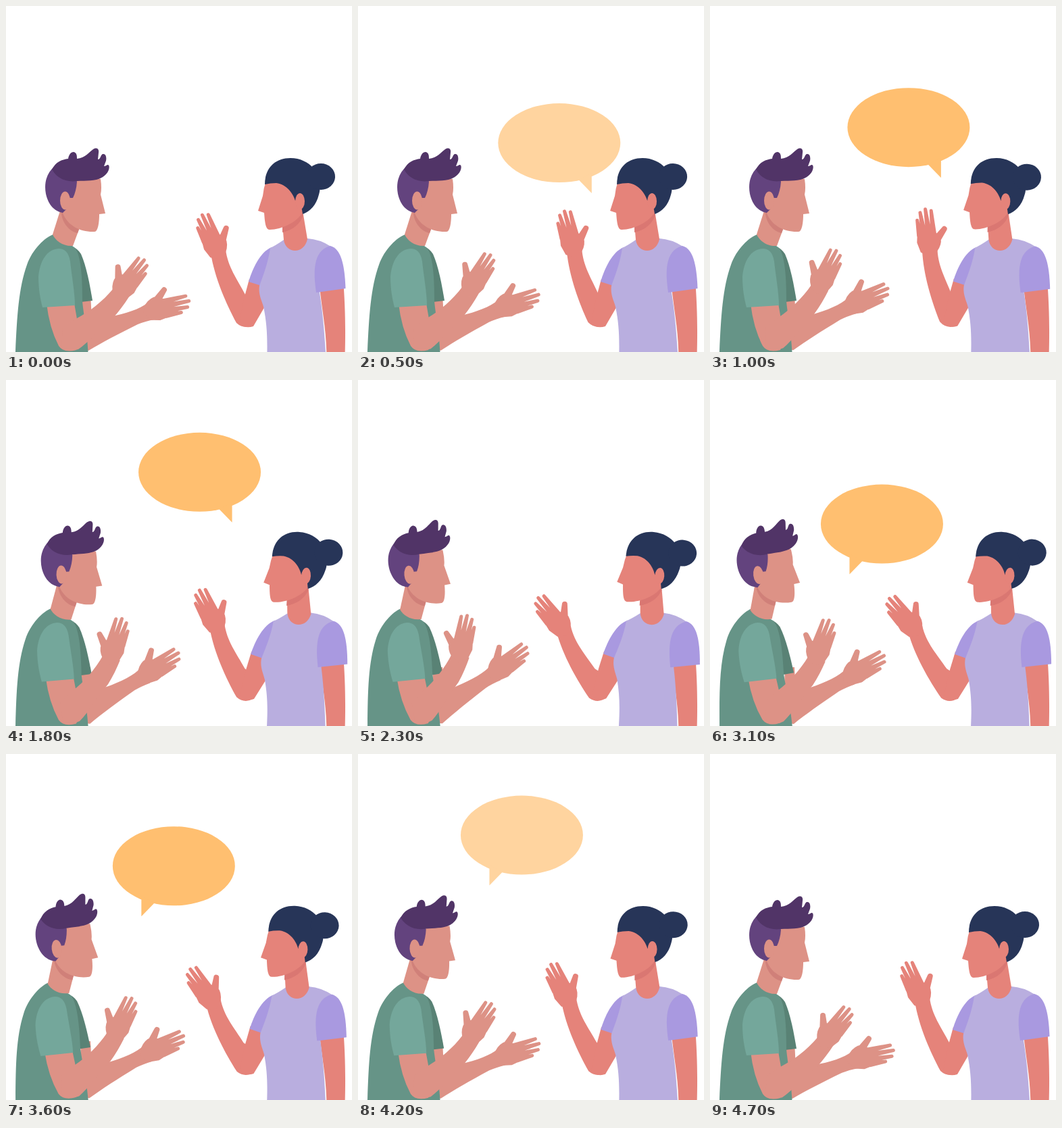
Write an HTML page that moves like this. It is 512 px wide and 512 px high and loops after 4.8 s.

```html
<!DOCTYPE html>
<html lang="en">
<head>
<meta charset="utf-8">
<title>Conversation</title>
<style>
html, body { margin: 0; width: 100%; height: 100%; overflow: hidden; background: #fff; }
svg { display: block; width: 100%; height: 100%; }
.his { fill: #dd9286; }
.her { fill: #e5837a; }
.bubble { fill: #ffbf70; }
</style>
</head>
<body>
<svg viewBox="0 0 512 512">
  <defs>
    <g id="balloon"><ellipse rx="90.5" ry="58.5"/><path d="M29 55L48 74.5V44Z"/></g>
    <path id="hand"/>
  </defs>

  <g class="bubble" id="herBubble"><use href="#balloon"/></g>
  <g class="bubble" id="hisBubble"><use href="#balloon" transform="scale(-1 1)"/></g>

  <!-- man -->
  <g class="his">
    <path d="M111 425H125L127 465L122 500H108Z"/>
    <g id="hisFarArm">
      <path d="M112 470C125 465 138 464 153 460C178 455 197 449 210 439L219 464Q205 467 195 471C165 486 142 498 122 510L108 506Z"/>
      <use id="hisFarHand" href="#hand"/>
    </g>
  </g>
  <g id="hisBody">
    <path fill="#598275" d="M98 356Q106 359 111 367C119 385 124 412 128 436L111 438L98 400Z"/>
    <path fill="#669487" d="M70 338C58 342 39 360 31 383C17 422 16 470 13 532H122C122 490 115 460 113 437C113 410 112 385 107 368Q104 358 98 355Z"/>
    <path class="his" d="M60 440H101L105 463L112 490L104 509Q86 514 78 503Q64 476 60 440Z"/>
    <path fill="#74a79b" d="M78 359C60 360 50 378 48 400C48 420 51 434 54 446L102 443C102 425 97 398 95 378C93 364 86 359 78 359Z"/>
    <g id="hisHead" class="his">
      <path d="M81 300L69 338C73 347 84 356 99 355L109 328L104 280Z"/>
      <path fill="#d08079" d="M82 300C80 318 93 334 106 336L110 325Z"/>
      <path d="M100 250L140 256Q142 270 140 279L147 307L138 308C138 321 136 334 131 334C112 335 88 326 82 300Z"/>
      <path fill="#63437e" d="M72 237C60 247 56 262 59 278C63 296 73 304 84 306L90 300L94 284H99Q104 274 105 260L100 245Z"/>
      <ellipse cx="87.500" cy="288" rx="7.500" ry="13.500"/>
      <path fill="#513467" d="M68 242C73 231 83 227 92 226C93 220 96 216 100 216C105 217 105 222 105 226C117 225 123 216 129 212C134 209 138 211 137 217L136 227C140 227 140 220 143 219C148 218 149 224 148 229L145 237C148 237 149 235 151 235C154 236 153 244 148 249C138 260 122 258 105 259C90 261 76 256 68 242Z"/>
    </g>
  </g>
  <g class="his" id="hisNearArm">
    <path d="M84 475L105 462C124 452 143 437 158 419L182 430C175 441 167 452 158 462C141 476 122 498 107 508Q92 512 82 506Z"/>
    <use id="hisNearHand" href="#hand"/>
  </g>

  <!-- woman -->
  <path class="her" d="M464 405H499C502 445 503 480 501 532H474C476 488 468 455 464 415Z"/>
  <g class="her" id="herArm">
    <path d="M303 366C309 403 326 441 341 469Q352 479 366 472L370 440L354 427C342 404 328 386 325 360Z"/>
    <use id="herHand" href="#hand"/>
  </g>
  <g id="herBody">
    <path class="her" d="M360 404L353 430L345 470Q354 478 366 474L384 443L380 408Z"/>
    <path fill="#a999e0" d="M393 357C376 364 365 388 359 408L378 414L396 380Z"/>
    <path fill="#b9aedf" d="M411 346Q398 355 391 358C388 380 380 400 375 414C373 427 379 437 381 445C387 474 387 495 386 532H474C472 490 469 455 464 424L481 356Q464 345 446 344Z"/>
    <path fill="#a999e0" d="M480 355C495 359 501 380 502.500 418L459 424C455 396 453 362 480 355Z"/>
    <g id="herHead" class="her">
      <path d="M409 322L411 346C414 367 441 368 446 345L439 303Z"/>
      <path fill="#da7772" d="M409 322V335C424 332 436 322 440 309L430 300Z"/>
      <path d="M385 258Q381 270 380 281L373 303L382 306C383 319 384 331 390 331C408 331 432 319 439 305L430 260Z"/>
      <path fill="#273558" d="M383 264C383 241 397 225 421 225C435 225 447 231 455 240C463 249 467 267 463 279C459 295 450 304 439 308L436 290L428 288C425 278 416 264 400 262Q391 262 383 264Z"/>
      <ellipse fill="#273558" cx="466" cy="252.500" rx="21" ry="19.500"/>
      <ellipse cx="435" cy="289" rx="7" ry="12"/>
    </g>
  </g>
</svg>
<script>
const LOOP = 4800, STEP = 100;
const el = id => document.getElementById(id);
const clamp = x => Math.max(0, Math.min(1, x));
const ramp = (t, from, to) => clamp((t - from) / (to - from));
const ease = (t, from, to) => (1 - Math.cos(Math.PI * ramp(t, from, to))) / 2;

// Point at a clockwise angle from "up", in hand space.
function polar(angle, r) {
  const a = angle * Math.PI / 180;
  return [r * Math.sin(a), -r * Math.cos(a)];
}

function finger([x0, y0], [x1, y1], wide, thin) {
  const d = Math.hypot(x1 - x0, y1 - y0);
  const ux = (x1 - x0) / d, uy = (y1 - y0) / d;
  const side = (x, y, w) => `${x - uy * w} ${y + ux * w}`;
  x1 -= ux * thin;
  y1 -= uy * thin;
  return `M${side(x0, y0, -wide)}L${side(x1, y1, -thin)}`
    + `A${thin} ${thin} 0 0 1 ${side(x1, y1, thin)}L${side(x0, y0, wide)}Z`;
}

// Wrist at the origin, index finger up, the others fanned out clockwise.
function handPath() {
  let d = "M-11 2Q-18 -8 -16 -18L-6 -29L9 -29L19 -21L19 -10L13 4L0 10Z";
  d += finger(polar(-32, 18), polar(-33, 42), 6, 4);
  for (let i = 0; i < 4; i++) {
    const length = 63 - 3 * (i - .9) ** 2;
    d += finger(polar(16 * i - 11, 25), polar(8 * i, length), 4.4, 2.5);
  }
  return d;
}
el("hand").setAttribute("d", handPath());

const turn = (id, angle, x, y) =>
  el(id).setAttribute("transform", `rotate(${angle} ${x} ${y})`);
const placeHand = (id, angle, x, y, flip = 1) =>
  el(id).setAttribute("transform", `translate(${x} ${y}) rotate(${angle}) scale(${flip} 1)`);

// A bubble fades in, drifts upwards around its middle height and fades out.
function bubble(id, t, start, middle, x, y, rise, drift) {
  const lift = rise * Math.sin((t - middle) / 800);
  const end = start + 1800;
  el(id).setAttribute("transform", `translate(${x - drift * lift} ${y - lift})`);
  el(id).setAttribute("opacity", Math.min(ramp(t, start, start + 300), ramp(t, end, end - 300)));
}

function draw(t) {
  const hisLean = ease(t, 1000, 3000) - ease(t, 3100, 4700);
  const herLean = ease(t, 400, 2400) - ease(t, 2400, 4500);
  const reach = 19.4 * (ramp(t, -100, 2350) - ramp(t, 2350, 4700)) - .9;
  const wave = 2 * ease(t, 950, 2500) - ease(t, 0, 950) - ease(t, 2900, 4700);

  turn("hisBody", -3 * hisLean, 75, 510);
  turn("hisHead", -4.3 * hisLean, 95, 345);
  turn("hisNearArm", -.73 * reach, 90, 495);
  placeHand("hisNearHand", 29 - .69 * reach, 168, 424);
  turn("hisFarArm", -.62 * reach, 115, 495);
  placeHand("hisFarHand", 68 - .7 * reach, 212, 451);

  turn("herBody", 2.4 * herLean, 430, 502);
  turn("herHead", 2.3 * herLean, 425, 350);
  turn("herArm", -6.5 * wave, 355, 460);
  placeHand("herHand", -15 - 10.5 * wave, 314, 365, -1);

  bubble("herBubble", t, 300, 1250, 291.5, 165.5, 46, .17);
  bubble("hisBubble", t, 2600, 3400, 250.8, 184.8, 77, .129);
}

const begin = performance.now();
function frame() {
  const t = (performance.now() - begin) % LOOP;
  draw(Math.floor(t / STEP) * STEP);
  requestAnimationFrame(frame);
}
frame();
</script>
</body>
</html>
```
